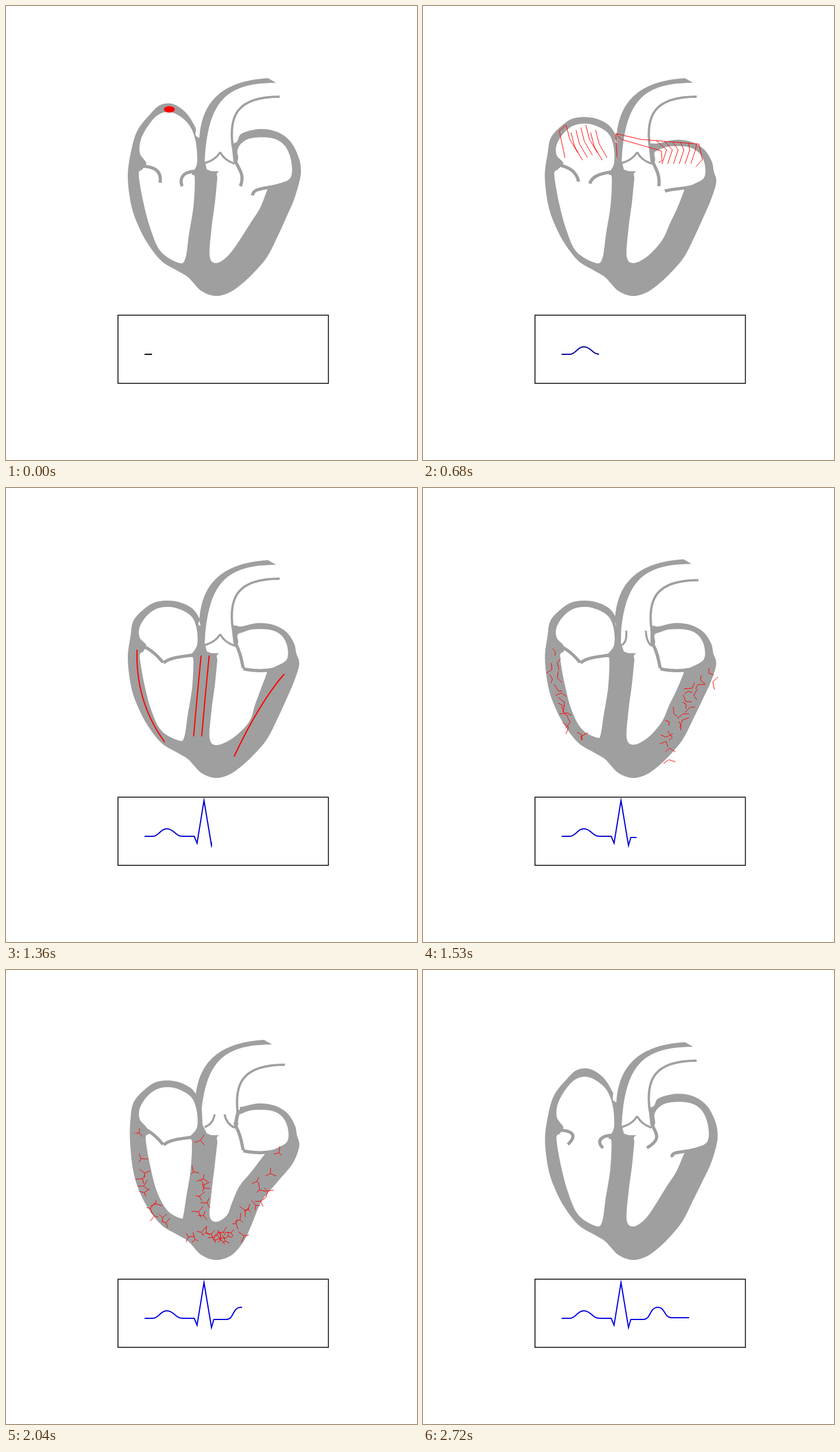
Recreate the animation shown at these times as an HTML page with a canvas. Size 712x786 px, loop 2890 ms.

```html
<!DOCTYPE html>
<html lang="en">
<head>
<meta charset="utf-8">
<title>Heartbeat and ECG</title>
<style>
html, body { margin: 0; width: 100%; height: 100%; overflow: hidden; background: #fff; }
canvas { display: block; width: 712px; height: 786px; }
</style>
</head>
<body>
<canvas id="stage" width="712" height="786"></canvas>
<script>
const ctx = document.getElementById('stage').getContext('2d');
const STEP = 170, STEPS = 17;
const GREY = '#9f9f9f', RED = '#f00';

const pts = s => s.split(' ').map(p => p.split(',').map(Number));
const clamp = u => Math.max(0, Math.min(1, u));
const rise = (t, from, to) => {
  const u = clamp((t - from) / (to - from));
  return u * u * (3 - 2 * u);
};
const bump = (y, mid, half) => (1 + Math.cos(Math.PI * Math.min(1, Math.abs(y - mid) / half))) / 2;

// The relaxed heart; every other pose is a deformation of it.
const outerRA = pts('217,250 228,215 250,187 268,171 290,170 312,185 328,210 334,228');
const outerLA = pts('393,238 408,221 440,213 470,218 493,235 507,262 511,285');
const wall = pts('508,305 499,335 486,365 470,400 452,435 428,463 405,484 385,497 362,502 ' +
  '338,493 316,470 300,460 270,442 246,412 229,380 217,345 211,295');
const innerRA = pts('243,272 232,255 234,230 250,202 268,186 290,185 315,203 328,232 331,272');
const innerRV = pts('322,291 327,297 325,345 317,395 311,436 300,445 268,425 250,385 238,340 230,292 236,283');
const innerLA = pts('400,270 401,249 411,235 430,228 462,229 483,242 494,268 493,297 470,310 455,316');
const innerLV = pts('452,320 440,350 424,375 405,405 385,432 365,445 353,434 356,385 362,340 366,300 368,287');

// How far each part has moved at a step
const phase = t => ({
  atria: rise(t, 0, 5) - rise(t, 10.5, 17),
  fill: rise(t, 2, 6) - rise(t, 7, 11),
  right: rise(t, 6, 10) - rise(t, 12, 17),
  left: rise(t, 8.5, 11.5) - rise(t, 12, 17),
  aorta: rise(t, 8, 10.5) - rise(t, 12.5, 15.5),
  cusps: rise(t, 8, 9) - rise(t, 10, 14),
  shut: clamp(t / 8) - rise(t, 14, 15.5),
  recoil: rise(t, 14, 16)
});

// Atria flatten towards the valve plane, ventricle walls close in.
const squashRA = (m, spread) => ([x, y]) => {
  const h = Math.max(0, (270 - y) / 100);
  return [283 + (x - 283) * (1 + spread * m.atria * h * h), y + 26 * m.atria * h];
};
const squashLA = m => ([x, y]) => [
  x - 8 * m.atria * (x - 400) / 110,
  y + .27 * m.atria * Math.max(0, 290 - y) * clamp((x - 393) / 15)
];
const squeezeWall = m => ([x, y]) => [
  x > 390 ? x - 28 * m.left * bump(y, 412, 95) : x + 4 * m.left * bump(y, 310, 100), y
];
const squeezeRV = m => ([x, y]) => [
  x + (12 * m.right - 5 * m.fill) * clamp((310 - x) / 40) - 5 * m.right * clamp((x - 300) / 15),
  y - 15 * m.right * clamp((y - 400) / 45)
];
const squeezeLV = m => ([x, y]) => [
  x + 20 * (m.fill * bump(y, 415, 75) - m.left * bump(y, 375, 80)) * clamp((x - 360) / 40),
  y - 9 * m.left * clamp((y - 400) / 40)
];

// Closed Catmull-Rom curve
function blobShape(p, color) {
  const n = p.length, at = i => p[(i + n) % n];
  ctx.fillStyle = color;
  ctx.beginPath();
  ctx.moveTo(...p[0]);
  for (let i = 0; i < n; i++) {
    const [a, b, c, d] = [at(i - 1), at(i), at(i + 1), at(i + 2)];
    ctx.bezierCurveTo(b[0] + (c[0] - a[0]) / 6, b[1] + (c[1] - a[1]) / 6,
      c[0] - (d[0] - b[0]) / 6, c[1] - (d[1] - b[1]) / 6, c[0], c[1]);
  }
  ctx.fill();
}

function line(path, color, width) {
  ctx.strokeStyle = color;
  ctx.lineWidth = width;
  ctx.stroke(path);
}

function shifted(x, y, paint) {
  ctx.save();
  ctx.translate(x, y);
  paint();
  ctx.restore();
}

const aorta = new Path2D('M335 230C338 180 360 130 454 125L468 133C380 133 350 165 344 270Z');
const arch = new Path2D('M393 245C385 190 400 157 474 157');
const lumen = (dl, dr) => new Path2D(
  `M${358 - dl} 195L${346 - dl} 235L${344 - dl / 2} 268L348 283L356 286H368L400 284L396 274L${393 + dr} 245V205Z`);

// Bezier points when open and shut, then the sideways recoil of the tip
const leaflets = [
  ['230,277 256,277 270,284 267,306', '234,272 252,280 262,290 272,302', -16],
  ['331,286 306,286 300,298 305,312', '331,288 310,292 284,292 273,303', 7],
  ['397,268 404,284 414,292 406,312', '397,268 406,284 408,298 411,312', -18],
  ['485,306 458,318 428,312 427,328', '485,306 460,319 435,318 411,313', 5]
].map(([open, shut, back]) => ({ open: pts(open), shut: pts(shut), back }));

function valves(m) {
  for (const { open, shut, back } of leaflets) {
    const p = open.map(([x, y], i) => [x + (shut[i][0] - x) * m.shut, y + (shut[i][1] - y) * m.shut]);
    p[3][0] += back * m.recoil;
    p[3][1] -= 4 * m.recoil;
    line(new Path2D(`M${p[0]}C${p.slice(1)}`), GREY, 5.5);
  }
  line(new Path2D(`M${394 + 9 * m.aorta} 242L397 269`), GREY, 6);
  const q = m.cusps, tip = 253 - 6 * q;
  line(new Path2D(`M344 272Q${363 - 9 * q} 267 ${371 - 19 * q} ${tip}`), GREY, 3.5);
  line(new Path2D(`M396 273Q${378 + 9 * q} 267 ${371 + 15 * q} ${tip}`), GREY, 3.5);
}

function heart(m) {
  const inRA = squashRA(m, .3), outRA = squashRA(m, .42), la = squashLA(m);
  blobShape([...outerRA.map(outRA), ...outerLA.map(la), ...wall.map(squeezeWall(m))], GREY);
  ctx.fillStyle = '#fff';
  ctx.fill(lumen(7 * m.aorta, 12 * m.aorta));
  blobShape([...innerRA.map(inRA), ...innerRV.map(squeezeRV(m))], '#fff');
  blobShape([...innerLA.map(la), ...innerLV.map(squeezeLV(m))], '#fff');
  shifted(-7 * m.aorta, -4 * m.aorta, () => {
    ctx.fillStyle = GREY;
    ctx.fill(aorta);
  });
  shifted(9 * m.aorta, 7 * m.aorta, () => line(arch, GREY, 4));
  valves(m);
}

function seeded(seed) {
  return () => (seed = (seed * 16807) % 2147483647) / 2147483647;
}

// Middle line of each muscle wall and the spread around it
const muscle = {
  left: { q: pts('227,280 224,370 275,440'), w: [8, 4] },
  septum: { q: pts('345,290 338,360 332,430'), w: [15, 4] },
  right: { q: pts('482,322 440,370 395,465'), w: [17, 8] },
  apex: { q: pts('315,452 345,465 395,465'), w: [10, 17] }
};

// Random sprigs of one to three arms along a wall
function sprigs(name, count, { reach = 1, arms, len, lean = 1, dx = 0 }) {
  const rnd = seeded(count * 97 + arms), path = new Path2D(), { q, w } = muscle[name];
  for (let i = 0; i < count; i++) {
    const u = reach * ((i + rnd()) / count) ** lean;
    const [x, y] = [0, 1].map(c => (1 - u) ** 2 * q[0][c] + 2 * u * (1 - u) * q[1][c] + u * u * q[2][c] +
      (rnd() * 2 - 1) * w[c]);
    const turn = rnd() * 6.28;
    for (let k = 0; k < arms; k++) {
      const a = turn + k * 2.1 + rnd() * .6, r = len * (.6 + rnd() * .7);
      path.moveTo(x + dx, y);
      path.lineTo(x + dx + r * Math.cos(a), y + r * Math.sin(a));
    }
  }
  line(path, RED, 1);
}

function spot(x, y, rx, ry) {
  ctx.fillStyle = RED;
  ctx.beginPath();
  ctx.ellipse(x, y, rx, ry, 0, 0, 7);
  ctx.fill();
}

const sinusPath = new Path2D('M284 257L269 237L268 222L271 214L279 232L300 251');

function atrialWave() {
  const path = new Path2D('M246 263L236 216L248 206M336 262L334 221L378 231L478 239L484 266L473 278' +
    'M334 221L344 231L413 251L414 268L408 271');
  for (let i = 0; i < 7; i++) {
    const x = 248 + 8.5 * i, y = 206 + 13 * ((i * 3) % 4) / 3;
    path.moveTo(x, y);
    path.lineTo(x + 6, y + 24);
    path.lineTo(x + 20, y + 48);
  }
  for (let i = 0; i < 6; i++) {
    const x = 404 + 14 * i, bend = 10 - 4 * i;
    path.moveTo(x, 233 + i);
    path.lineTo(x + bend + 8, 249);
    path.lineTo(x + bend, 273);
  }
  line(path, RED, 1);
}

function node(tail) {
  spot(337, 280, 7.5, 8.5);
  if (tail) line(new Path2D('M335 287L348 290L368 288'), RED, 4);
}

function conduct(name, dx = 0) {
  const [a, b, c] = muscle[name].q;
  shifted(dx, 0, () => line(new Path2D(`M${a}Q${b} ${c}`), RED, 2));
}

function signal(step, m) {
  if (step < 3) spot(283 + step * 1.3, 179 + step * 2.5, 9.5 - step * 1.5, 5.5 - step * .7);
  if (step === 1 || step === 2) line(sinusPath, RED, 3);
  if (step >= 2 && step <= 4) atrialWave();
  if (step >= 5 && step <= 7) node(step > 5);
  if (step === 7 || step === 8) [-7, 7].forEach(dx => conduct('septum', dx));
  if (step === 8) ['left', 'right'].forEach(name => conduct(name));

  const dx = 16 * (1 - m.left);
  if (step === 9 || step === 10) {
    const look = { arms: 2, len: 11 };
    sprigs('left', 15, look);
    sprigs('right', 20, { ...look, dx });
  } else if (step >= 11 && step <= 13) {
    const look = { arms: 3, len: 10, lean: .6 };
    sprigs('left', 11, look);
    sprigs('septum', 9, look);
    sprigs('right', 13, { ...look, dx });
    sprigs('apex', 12, look);
  } else if (step === 14 || step === 15) {
    const look = { arms: 1, len: 5, reach: step === 14 ? .6 : .3 };
    sprigs('left', 42, look);
    sprigs('septum', 50, look);
    sprigs('right', 65, { ...look, dx });
  }
}

const trace = new Path2D('M240 603H254C265 603 267 590 279 590C291 590 293 603 306 603H326L331 615L343 541' +
  'L356 619L360 605H382C395 605 392 584 407 584C420 584 417 602 431 602H464');

function ecg(step) {
  ctx.strokeStyle = '#000';
  ctx.lineWidth = 1.5;
  ctx.strokeRect(194, 535.3, 364.5, 118);
  ctx.save();
  ctx.beginPath();
  ctx.rect(230, 530, 23 + 13 * step, 130);
  ctx.clip();
  line(trace, `rgb(0,0,${Math.round(235 * (1 - Math.exp(-step / 4)))})`, 2);
  ctx.restore();
}

function draw(step) {
  const m = phase(step);
  ctx.fillStyle = '#fff';
  ctx.fillRect(0, 0, 712, 786);
  heart(m);
  signal(step, m);
  ecg(step);
}

const start = performance.now();
let shown = -1;
function tick() {
  const step = Math.floor((performance.now() - start) / STEP) % STEPS;
  if (step !== shown) draw(shown = step);
  requestAnimationFrame(tick);
}
tick();
</script>
</body>
</html>
```
